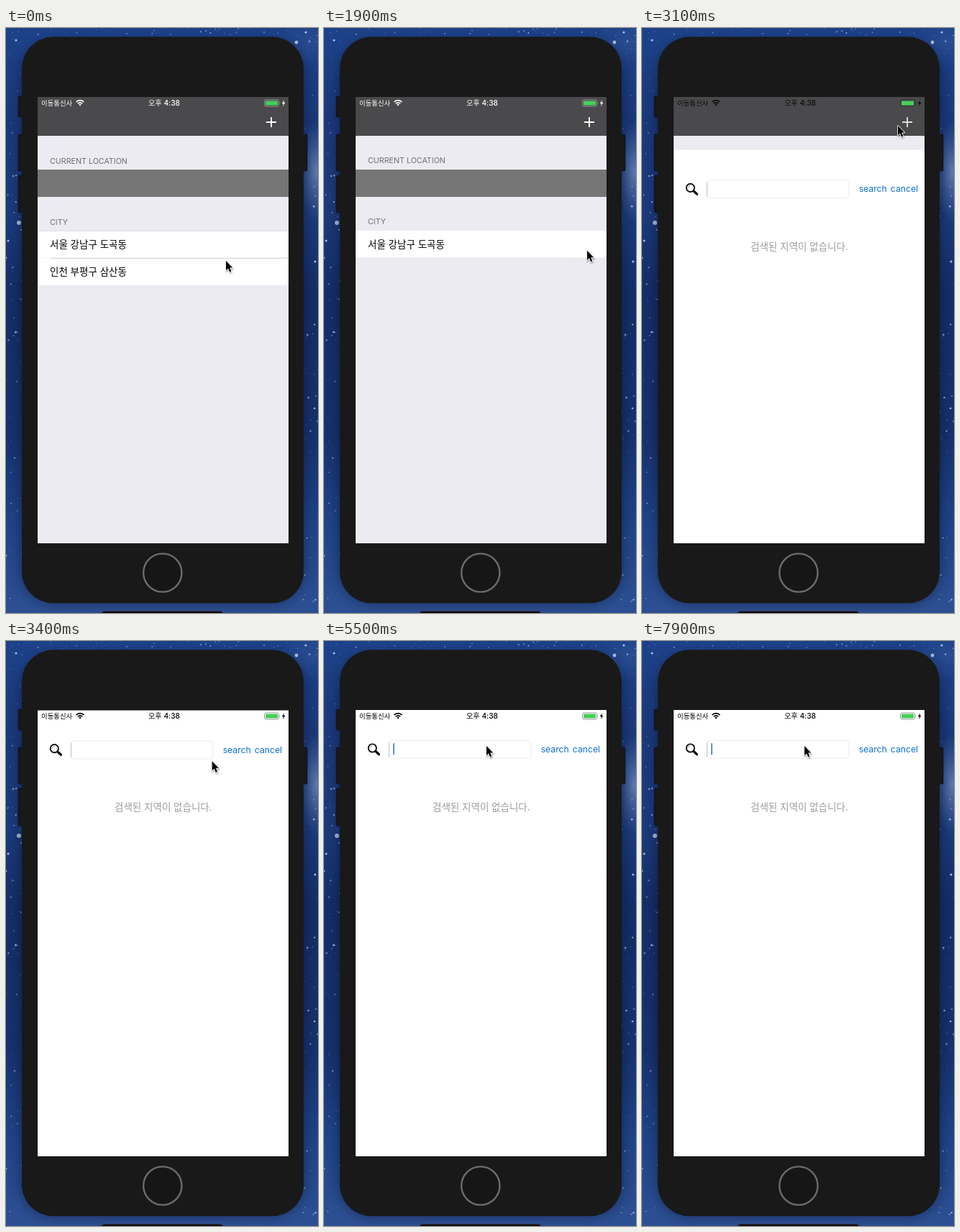
An HTML page for the animation above (8 s loop, 434x814 px).

```html
<!DOCTYPE html>
<html lang="ko">
<head>
<meta charset="utf-8">
<style>
html, body { margin: 0; width: 100%; height: 100%; overflow: hidden; background: #1b3a7c; }
svg { display: block; width: 434px; height: 814px; }
text { font-family: Inter, "Noto Sans CJK KR", "Noto Sans CJK", sans-serif; white-space: pre; }
.ko { font-family: "Noto Sans CJK KR", "Noto Sans CJK", sans-serif; font-size: 13.5px; }
.head { font-size: 10.7px; fill: #6d6d72; }
.action { font-size: 12.2px; fill: #0b6fd0; }
</style>
</head>
<body>
<svg viewBox="0 0 434 814">
  <defs>
    <linearGradient id="sky" x2="0" y2="1">
      <stop offset="0" stop-color="#1d428a"/>
      <stop offset=".15" stop-color="#1a397a"/>
      <stop offset=".33" stop-color="#1a3a7a"/>
      <stop offset=".45" stop-color="#142e68"/>
      <stop offset=".7" stop-color="#16326e"/>
      <stop offset=".85" stop-color="#1f4488"/>
      <stop offset="1" stop-color="#2d5093"/>
    </linearGradient>
    <radialGradient id="haze">
      <stop offset="0" stop-color="#7d96c4" stop-opacity=".7"/>
      <stop offset="1" stop-color="#5f7cb4" stop-opacity="0"/>
    </radialGradient>
    <filter id="shade" x="-20%" y="-20%" width="140%" height="140%"><feGaussianBlur stdDeviation="9"/></filter>
    <filter id="soft" x="-50%" y="-50%" width="200%" height="200%"><feGaussianBlur stdDeviation="1"/></filter>
    <clipPath id="screen"><rect x="44" y="96" width="349" height="621"/></clipPath>
    <clipPath id="rowClip"><rect id="rowBox" x="44" y="320" width="349" height="38"/></clipPath>
    <path id="arrow" d="M0 0V13.2L3 10.4L5.1 15.6L7.3 14.6L5.2 9.6H9.2Z"/>
  </defs>

  <rect width="434" height="814" fill="url(#sky)"/>
  <ellipse cx="432" cy="200" rx="28" ry="70" fill="url(#haze)"/>
  <ellipse cx="426" cy="20" rx="45" ry="35" fill="url(#haze)" opacity=".2"/>
  <g id="stars" fill="#c3d4ee"></g>
  <rect x="22" y="20" width="392" height="780" rx="46" fill="#020817" opacity=".45" filter="url(#shade)"/>

  <g fill="#17181b" stroke="#0c0d10" stroke-width=".6">
    <rect x="17" y="95" width="8" height="29" rx="1.5"/>
    <rect x="17" y="148" width="8" height="51" rx="1.5"/>
    <rect x="17" y="205" width="8" height="52" rx="1.5"/>
    <rect x="411" y="148" width="8" height="51" rx="1.5"/>
  </g>
  <rect x="22" y="12.3" width="392" height="788" rx="44" fill="#191919"/>
  <circle cx="217.8" cy="758" r="26.6" fill="#161616" stroke="#6c6c6c" stroke-width="2.4"/>
  <rect x="133" y="811.5" width="169" height="8" rx="4" fill="#0d0b0e" stroke="#4a2b3c" stroke-width=".7"/>

  <g clip-path="url(#screen)">
    <rect x="44" y="96" width="349" height="621" fill="#ebebf1"/>
    <rect x="44" y="197" width="349" height="38" fill="#757575"/>
    <rect x="44" y="282" width="349" height="37.5" fill="#fff"/>
    <g id="row" clip-path="url(#rowClip)">
      <rect x="44" y="319" width="349" height="39" fill="#fff"/>
      <g id="delete">
        <rect x="393" y="320" width="349" height="38" fill="#fc3428"/>
        <text x="411" y="343.3" font-size="12.4" fill="#fff">Delete</text>
      </g>
      <text id="city" class="ko" x="61" y="343.6">인천 부평구 삼산동</text>
    </g>
    <path id="line" d="M61 320.5H393" stroke="#d0d0d4" stroke-width=".8"/>
    <path id="edge" d="M44 282.5H393" stroke="#cfcfd4" stroke-width=".6"/>
    <g id="labels">
      <text class="head" x="61" y="188.3">CURRENT LOCATION</text>
      <text class="head" x="61" y="273.3">CITY</text>
      <text class="ko" x="61" y="305.6">서울 강남구 도곡동</text>
    </g>
    <rect x="44" y="96" width="349" height="54" fill="#4a4a4c"/>
    <path id="plus" d="M362 131H376M369 124V138" stroke="#fff" stroke-width="1.8"/>

    <g id="sheet">
      <rect x="44" y="96" width="349" height="650" fill="#fff"/>
      <path d="M72.2 153.8L76.4 157.7" stroke="#111" stroke-width="3.4" stroke-linecap="round"/>
      <circle cx="67.3" cy="149" r="5.6" fill="#fff" stroke="#111" stroke-width="1.9"/>
      <path d="M64.3 148.5A3.2 3.2 0 0 1 67 145.8" fill="none" stroke="#888" stroke-width=".9"/>
      <rect x="90.5" y="138.3" width="197.5" height="25" rx="4" fill="#fff" stroke="#e2e2e2" stroke-width=".7"/>
      <path d="M90.5 141V161" stroke="#aaa" stroke-width=".7"/>
      <text id="typed" x="96" y="155.2" font-size="12.4">d</text>
      <rect id="caret" y="142.3" width="1.6" height="16" fill="#3f70d2"/>
      <text class="action" x="301.7" y="155">search</text>
      <text class="action" x="345.8" y="155">cancel</text>
      <text class="ko" x="151" y="235.8" fill="#9b9b9b">검색된 지역이 없습니다.</text>
    </g>

    <g id="status">
      <text class="ko" x="49" y="107.8" style="font-size:9.4px">이동통신사</text>
      <text x="220" y="108" font-size="10.2" font-weight="500" text-anchor="middle">오후 4:38</text>
      <g fill="none" stroke="currentColor" stroke-width="1.7">
        <path d="M97.6 102.9A7.6 7.6 0 0 1 108.4 102.9"/>
        <path d="M99.8 105.2A4.5 4.5 0 0 1 106.2 105.2"/>
      </g>
      <path d="M101.2 106.6A2.6 2.6 0 0 1 104.8 106.6L103 108.6Z"/>
      <rect x="359.5" y="100" width="20" height="9" rx="2.2" fill="none" stroke="currentColor" stroke-width=".8" opacity=".5"/>
      <path d="M380.6 103V106.2Q381.8 104.6 380.6 103Z" opacity=".5"/>
      <rect x="361" y="101.4" width="17" height="6.2" rx="1.2" fill="#45d058"/>
      <path d="M387 100.2L383.8 105H385.8L385 109L388.4 103.8H386.3Z"/>
    </g>
  </g>

  <g id="cursor">
    <use href="#arrow" x=".6" y="1.6" opacity=".35" stroke="#000" stroke-width="1.6" filter="url(#soft)"/>
    <use href="#arrow" fill="#000" stroke="#fff" stroke-width="1.6" stroke-linejoin="round" paint-order="stroke"/>
  </g>
</svg>
<script>
const LOOP = 8000;
const $ = id => document.getElementById(id);
const clamp = v => Math.min(1, Math.max(0, v));
const ramp = (t, a, b) => clamp((t - a) / (b - a));
const smooth = p => p * p * (3 - 2 * p);
const set = (id, attrs) => { for (const k in attrs) $(id).setAttribute(k, attrs[k]); };
const show = (id, on) => set(id, { visibility: on ? 'visible' : 'hidden' });
const move = (id, x, y) => set(id, { transform: `translate(${x} ${y})` });

// time, x, y of the pointer tip
const pointer = [
  [0, 306, 324], [200, 306, 325], [600, 236, 334], [750, 236, 336], [1060, 366, 342],
  [1700, 366, 342], [2500, 366, 137], [2950, 366, 137], [3100, 356, 136],
  [3700, 218, 198], [4700, 218, 198], [5200, 226, 146], [8000, 226, 146]
];

function pointerAt(t) {
  const i = Math.max(1, pointer.findIndex(p => p[0] > t));
  const [a, b] = [pointer[i - 1], pointer[i]];
  const k = smooth(ramp(t, a[0], b[0]));
  return [a[1] + (b[1] - a[1]) * k, a[2] + (b[2] - a[2]) * k];
}

function addStars() {
  let seed = 41;
  const rnd = () => (seed = seed * 16807 % 2147483647) / 2147483647;
  let out = '';
  const star = (x, y, r, o) => out += `<circle cx="${x}" cy="${y}" r="${r}" opacity="${o}"/>`;
  for (let i = 0; i < 150; i++) {
    const x = rnd() * 22 + (i % 2 ? 412 : 0);
    star(x, rnd() * 814, .4 + rnd() ** 3 * 1.1, .25 + rnd() * .55);
  }
  for (let i = 0; i < 40; i++) star(rnd() * 434, rnd() * 12, .4 + rnd() * .7, .3 + rnd() * .4);
  [[18, 271, 3], [404, 20, 2.4], [14, 17, 1.6], [417, 6, 1.6], [430, 325, 1.6], [3, 296, 1.5]]
    .forEach(([x, y, r]) => star(x, y, r, .85));
  $('stars').innerHTML = out;
}

function draw(t) {
  move('cursor', ...pointerAt(t));

  const touched = t >= 300;
  const nudge = touched ? 0 : .6;
  const remove = smooth(ramp(t, 1400, 1750));
  const swipe = 68 * smooth(ramp(t, 250, 600)) + 281 * remove;
  move('labels', 0, nudge);
  move('city', -swipe, nudge);
  move('delete', -swipe, 0);
  set('rowBox', { height: 38 * (1 - remove) });
  show('row', remove < 1);
  set('line', { opacity: remove < 1 ? (touched ? .55 : 1) : 0 });
  show('edge', !touched);

  const press = ramp(t, 2780, 2830) * (1 - ramp(t, 2950, 3150));
  set('plus', { opacity: 1 - .75 * press });

  // Critically damped spring for the sheet
  const s = 18.3 * Math.max(0, t - 2900) / 1000;
  move('sheet', 0, 621 * (1 + s) * Math.exp(-s));
  show('sheet', t > 2900);
  const tone = Math.round(255 * (1 - ramp(t, 2920, 3110)));
  const ink = `rgb(${tone},${tone},${tone})`;
  set('status', { fill: ink, color: ink });

  const typed = t >= 6300 && t < 7300;
  show('typed', typed);
  const since = t < 6300 ? t - 5300 : typed ? t - 6300 : t - 7300;
  show('caret', t >= 5300 && since % 1000 < 620);
  set('caret', { x: typed ? 102.4 : 96.2 });
}

addStars();
const start = performance.now();
(function tick() {
  draw((performance.now() - start) % LOOP);
  requestAnimationFrame(tick);
})();
</script>
</body>
</html>
```
